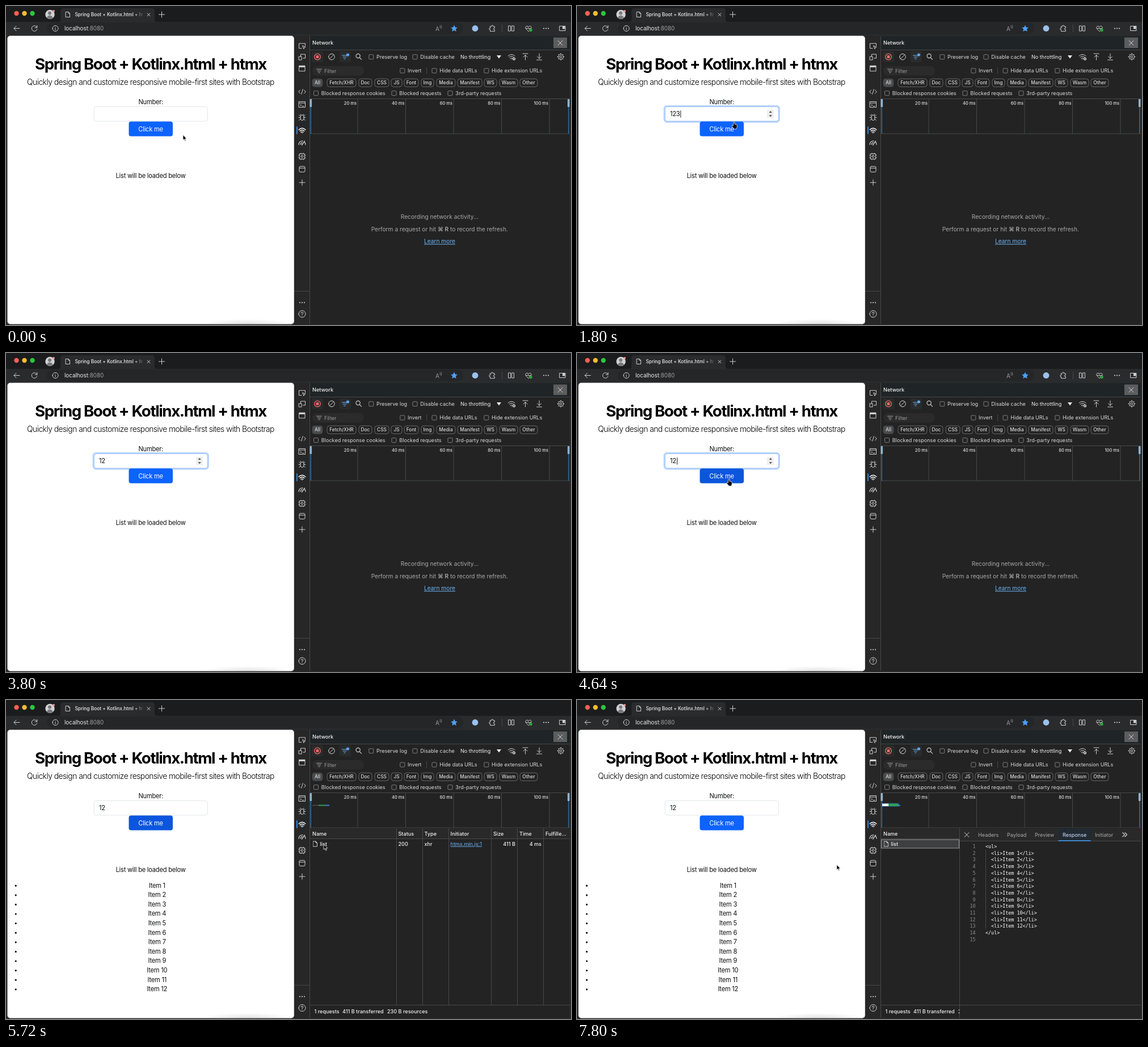
Animation, 996 px wide and 562 px high, one loop 8000 ms. Source, as an HTML page:

```html
<!DOCTYPE html>
<html lang="en">
<head>
<meta charset="utf-8">
<title>Spring Boot + Kotlinx.html + htmx</title>
<style>
html, body { margin: 0; width: 100%; height: 100%; overflow: hidden; background: #1b1c1d; }
svg { display: block; width: 100%; height: 100%; }
text { font-family: Inter, "Noto Sans", sans-serif; font-optical-sizing: none; font-size: 9.1px; fill: #d8d8d8; }
.title { font-size: 27.7px; font-weight: 700; letter-spacing: -1.41px; fill: #000; }
.lead { font-size: 13.84px; font-weight: 350; letter-spacing: -.52px; fill: #000; }
.page { font-size: 11.06px; letter-spacing: -.2px; fill: #0c0d0e; }
.white { fill: #fff; }
.tip { font-size: 9.2px; font-weight: 500; fill: #111; }
.tab { font-size: 8.3px; font-weight: 500; fill: #eee; }
.url { font-size: 9.8px; fill: #eee; }
.pill { font-size: 8.3px; font-weight: 500; }
.ruler { font-size: 7.5px; font-weight: 500; fill: #e4e4e4; }
.bright { font-weight: 500; fill: #f2f2f2; }
.note { font-size: 10.2px; fill: #a9a9a9; }
.dim { fill: #9a9a9a; }
.link { fill: #6cb4f5; text-decoration: underline; }
.code { font: 8.4px "DejaVu Sans Mono", monospace; fill: #fff; }
.num { fill: #8c8c8c; }
.mid { text-anchor: middle; }
.end { text-anchor: end; }
.i { fill: none; stroke: #cfcfcf; stroke-width: 1; stroke-linecap: round; stroke-linejoin: round; }
.line { fill: none; stroke: #474849; stroke-width: 1; }
</style>
</head>
<body>
<svg id="stage" viewBox="0 0 996 562" preserveAspectRatio="none"></svg>
<script>
const LOOP = 8000;
const range = n => Array.from({ length: n }, (_, k) => k);
const text = (x, y, s, cls = '', more = '') => `<text x="${x}" y="${y}" dy=".36em" class="${cls}" ${more}>${s}</text>`;
const rect = (x, y, w, h, fill, r = 0, more = '') => `<rect x="${x}" y="${y}" width="${w}" height="${h}" rx="${r}" fill="${fill}" ${more}/>`;
const dot = (x, y, r, fill) => `<circle cx="${x}" cy="${y}" r="${r}" fill="${fill}"/>`;
const path = (d, cls = 'i', more = '') => `<path d="${d}" class="${cls}" ${more}/>`;
const icon = (x, y, d, more = '') => path(d, 'i', `transform="translate(${x} ${y})" ${more}`);
const group = (id, ...parts) => `<g id="${id}">${parts.join('')}</g>`;
const ring = r => `M${-r} 0a${r} ${r} 0 1 1 ${2 * r} 0a${r} ${r} 0 1 1 ${-2 * r} 0z`;
const box = (w, h) => `M${-w / 2} ${-h / 2}h${w}v${h}h${-w}z`;
const dots = (x, y) => [-4, 0, 4].map(k => dot(x + k, y, 1.1, '#d0d0d0')).join('');
const check = (x, y, label) => rect(x - 4, y - 4, 8, 8, 'none', 1.2, 'stroke="#8b8b8b" stroke-width=".9"') + text(x + 9.3, y, label);

const PLUS = 'M-5 0H5M0 -5V5', CROSS = 'M-4 -4L4 4M4 -4L-4 4';
const PAGE = 'M-3.5 -4.5h4.5l2.5 2.5v6.5h-7zM1 -4.5v2.5h2.5';
const WIFI = 'M-6 -1.5Q0 -7 6 -1.5M-4 .8Q0 -2.8 4 .8M-2 3Q0 1.2 2 3M0 4.4v.2';
const GEAR = ring(2) + ring(4.6) + 'M0 -6v1.4M0 6v-1.4M-6 0h1.4M6 0h-1.4M-4.2 -4.2l1 1M4.2 4.2l-1 -1M4.2 -4.2l-1 1M-4.2 4.2l1 -1';
const FUNNEL = 'M-4.5 -3h9M-2.8 0h5.6M-1.2 3h2.4';
const BEAM = 'M-2 -5.5q2 0 2 1.3q0 -1.3 2 -1.3M0 -4.2V4.2M-2 5.5q2 0 2 -1.3q0 1.3 2 1.3M-1 .9h2';

const browser = [
  rect(0, 0, 996, 562, '#1b1c1d'),
  rect(0, 28, 996, 534, '#2a2b2c'),
  path('M92 28q4 0 4 -4v-15q0 -5 5 -5h156q5 0 5 5v15q0 4 4 4z', '', 'fill="#2a2b2c"'),
  dot(18.5, 13, 4.2, '#fe5f57'), dot(32.5, 13, 4.2, '#febc2e'), dot(46.5, 13, 4.2, '#28c840'),
  dot(77.5, 15, 8.2, '#d2d2d4'), dot(77, 12.5, 3, '#77787b'), path('M71.5 20.5q5.5 -8 11.5 0q-5.5 5 -11.5 0', '', 'fill="#77787b"'),
  dot(84, 9, 2, '#e59a95'),
  icon(109, 15, PAGE),
  text(121.5, 15, 'Spring Boot + Kotlinx.html + htmx', 'tab', 'clip-path="url(#tabClip)"'),
  rect(226, 7, 18, 17, 'url(#fade)'),
  icon(251.5, 15.3, 'M-2.5 -2.5l5 5M2.5 -2.5l-5 5'), icon(274.5, 15, PLUS),
  rect(72, 29, 734, 21, '#252627', 10),
  icon(19, 39.5, 'M5 0H-5M-1 -4.2L-5 0l4 4.2'),
  icon(50, 39.5, 'M4.6 -1.5A4.8 4.8 0 1 0 4.7 1.4M4.8 -5v3.6h-3.6'),
  icon(87, 39.5, ring(5) + 'M0 -.5v3M0 -2.6v.2'),
  text(103, 39.5, 'localhost<tspan fill="#a2a2a2">:8080</tspan>', 'url'),
  text(757, 40, 'A', 'dim', 'style="font-size:10px"'), icon(765, 37, 'M0 -2.2q1.4 2 0 4M2 -3.2q2.2 3 0 6', 'style="stroke:#999;stroke-width:.8"'),
  path('M790 33.6l1.8 3.8 4.1.5-3 2.9.8 4.1-3.7-2-3.7 2 .8-4.1-3-2.9 4.1-.5z', '', 'fill="#4ca0f8"'),
  dot(827, 39.5, 5.4, '#9cc0ee'),
  icon(857.5, 39.5, 'M-4 -3.5h2.4q-.4 -2 1.4 -2t1.4 2h2.6v3q-2 -.4 -2 1.3t2 1.3v3h-7.8v-3q-2 .3 -2 -1.3t2 -1.3z'),
  path('M874.5 33v13', 'line'),
  icon(890.5, 39.5, 'M-1.4 -4.5h-3.6v9h3.6zM1.4 -4.5H5v9H1.4z'),
  icon(921, 39.5, 'M0 5L-4.6 .6C-7 -3 -2.4 -6 0 -2.6C2.4 -6 7 -3 4.6 .6zM-4 0h2.5l1 -1.5 1.5 3 1 -1.5h2'),
  dot(925, 42.5, 2.8, '#2ba13a'),
  dots(952, 39.5),
  icon(981, 39.5, box(10, 8)), rect(981, 36, 4.5, 4.5, '#cfcfcf')
];

const page = [
  rect(2.5, 52.5, 505.3, 508, '#fff', 5),
  rect(345, 543, 162, 17, 'url(#shade)', 4),
  text(255, 102.3, 'Spring Boot + Kotlinx.html + htmx', 'title mid'),
  text(255, 134, 'Quickly design and customize responsive mobile-first sites with Bootstrap', 'lead mid'),
  text(255.3, 169.4, 'Number:', 'page mid'),
  text(255, 299, 'List will be loaded below', 'page mid'),
  group('focus', rect(153.9, 176.1, 202.7, 28.2, 'none', 5, 'stroke="#bdd6fd" stroke-width="2.8"')),
  rect(155.2, 177.4, 200.2, 25.6, '#fff', 4, 'id="field" stroke="#dee2e6" stroke-width=".9"'),
  group('spinner', rect(335, 183, 12, 14.5, '#efefef'), path('M338.6 188l2.6 -3 2.6 3zM338.6 192.3l2.6 3 2.6 -3z', '', 'fill="#444"')),
  ...['1', '12', '123'].map((s, k) => group('typed' + k, text(164, 190.5, s, 'page'))),
  group('caret', rect(0, 184.2, .9, 12.4, '#000')),
  rect(216.5, 203.6, 77.5, 26, '#0d63fd', 4, 'id="button"'),
  text(255, 216.9, 'Click me', 'page white mid'),
  group('tooltip',
    path('M153 209.3h3l5.5 -5 5.5 5h189q3 0 3 3v22q0 3 -3 3h-203q-3 0 -3 -3v-22q0 -3 3 -3z', '',
      'fill="#fff" stroke="#a3a3a3" stroke-width=".9" filter="url(#drop)"'),
    rect(156, 215.3, 15.5, 15.5, '#f58510', 1.5), rect(162.8, 217.8, 2, 6.7, '#fff'), rect(162.8, 226.2, 2, 2, '#fff'),
    text(177, 223.2, 'Value must be less than or equal to 100.', 'tip')),
  group('items', ...range(12).map(k => dot(17.2, 327.2 + k * 16.6, 1.6, '#0c0d0e') + text(266.3, 326.6 + k * 16.6, `Item ${k + 1}`, 'page mid')))
];

const pills = [['All', 540, 18], ['Fetch/XHR', 566, 51], ['Doc', 622, 23], ['CSS', 650, 25], ['JS', 679, 19], ['Font', 702, 25], ['Img', 732, 22],
  ['Media', 759, 33], ['Manifest', 796, 43], ['WS', 843, 22], ['Wasm', 870, 32], ['Other', 906, 31]];

const tools = [
  rect(508, 53, 28, 509, '#272727'),
  rect(536, 53, 457.5, 507.5, '#232323'),
  rect(536, 53, 457.5, 24, '#1f2426'),
  path('M535.5 53V560M508 502.5h27M536 77.5h457', 'line'),
  icon(522, 70.5, 'M-1 4h-4.5v-8.5h11v4M1 -.5l5 2.2 -2.2 .8 -.8 2.2z'),
  icon(522, 90, 'M-2.5 -1v-4h8v7h-4M-5.5 -1h4.5v6h-4.5z'),
  icon(522, 110, box(10, 9.5)), rect(517, 105, 10, 3, '#cfcfcf'),
  icon(522, 151, 'M-3.5 -3L-6.2 0l2.7 3M3.5 -3L6.2 0l-2.7 3M1.3 -4.3l-2.6 8.6'),
  icon(522, 173.5, box(11, 10) + 'M-5.5 -2.5h11M-3 0l1.8 1.3 -1.8 1.3M.3 3h2.6'),
  icon(522, 196.5, 'M-3 -1.5q0 -3 3 -3t3 3v3q0 3.5 -3 3.5t-3 -3.5zM-3 0h-3M3 0h3M-3 -2l-2.3 -2.3M3 -2l2.3 -2.3M-3 2.6l-2.3 2.3M3 2.6l2.3 2.3M-2 -4.5l-1 -1.6M2 -4.5l1 -1.6'),
  rect(512, 212, 1.8, 14, '#2f8ee8', 1),
  icon(522, 219.5, WIFI, 'style="stroke:#fff;stroke-width:1.2"'),
  icon(522, 242, 'M-6 2Q-5 -4.5 1 -4M4 -2.5Q6 -1 6 2M-3 2Q-2 -1.4 0 -1.4M-.5 3L4.5 -4', 'style="stroke-width:1.3"'),
  icon(522, 265, box(9, 9) + ring(2) + 'M-2 -4.5v-1.5M2 -4.5v-1.5M-2 4.5v1.5M2 4.5v1.5M-4.5 -2h-1.5M-4.5 2h-1.5M4.5 -2h1.5M4.5 2h1.5'),
  icon(522, 287.5, 'M-3 -5h6q2 0 2 2v6q0 2 -2 2h-6q-2 0 -2 -2v-6q0 -2 2 -2zM-5 -2h10'),
  icon(522, 311, PLUS), dots(522, 522.5),
  icon(522, 542.5, ring(6) + 'M-1.8 -1.3q0 -2 1.8 -2t1.8 1.7q0 1.2 -1.8 2v1M0 3.2v.2'),

  text(540, 65, 'Network', 'bright'),
  rect(965, 55.5, 24, 18.5, '#5b5d5e'), icon(977, 65, CROSS),
  rect(539, 80, 20, 19, '#2a2b2c', 2), rect(588, 80, 20, 19, '#2a2b2c', 2),
  icon(549, 89.5, ring(5.3), 'style="stroke:#ef6b66;stroke-width:1.3"'), rect(546.6, 87.1, 4.8, 4.8, '#ef6b66', .5),
  icon(574, 89.5, ring(5.3) + 'M-3.7 3.7l7.4 -7.4'),
  icon(597, 90, FUNNEL, 'style="stroke:#74b6f2;stroke-width:1.2"'), dot(602.5, 86, 2.6, '#5aa7f0'),
  icon(621.5, 89, 'M-4.5 -1a3.6 3.6 0 1 1 7.2 0a3.6 3.6 0 1 1 -7.2 0M1.8 1.8l3.2 3.4', 'style="stroke-width:1.2"'),
  check(643.8, 89.7, 'Preserve log'), check(721, 89.7, 'Disable cache'),
  text(801, 89.7, 'No throttling', '', 'style="fill:#f0f0f0"'), path('M865 87h8l-4 5.6z', '', 'fill="#eee"'),
  icon(891, 89.5, WIFI), dot(895.5, 93, 2.6, '#cfcfcf'), dot(895.5, 93, 1, '#232323'),
  icon(915.5, 89.5, 'M-4.5 -5.5h9M0 5.5V-3M-3.5 .4L0 -3l3.5 3.4'),
  icon(940, 89.5, 'M-4.5 5.5h9M0 -5.5V3M-3.5 -.4L0 3l3.5 -3.4'),
  icon(978, 89.5, GEAR),
  rect(540, 106, 91, 16.5, '#2b2b2b', 8), icon(552, 114.3, FUNNEL, 'style="stroke:#aaa"'), text(561, 114.3, 'Filter', 'dim'),
  check(698.8, 114, 'Invert'), path('M741.5 108v12', 'line'), check(755, 114, 'Hide data URLs'), check(846.8, 114, 'Hide extension URLs'),
  ...pills.map(([label, x, w], k) => rect(x, 128.3, w, 14, k ? 'none' : '#4a4b4c', 4, `stroke="${k ? '#77787a' : '#4a4b4c'}" stroke-width=".8"`) +
    text(x + w / 2, 135.5, label, 'pill mid')),
  check(546.5, 153.7, 'Blocked response cookies'), check(684, 153.7, 'Blocked requests'), check(783, 153.7, '3rd-party requests'),

  path('M536 163.5h457.5M536 225h457.5', 'line'),
  ...range(5).map(k => path(`M${620 + k * 84.5} 164v61`, 'line') + text(618 + k * 84.5, 171, `${20 * (k + 1)} ms`, 'ruler end')),
  ...[537.3, 991.7].map(x => rect(x - .6, 164, 1.2, 61, '#2f7fb8') + rect(x - 1.8, 164, 3.6, 14, '#8fb3cd', 1)),
  group('thinBar', rect(540, 185, 11, 1.2, '#555'), rect(551, 184.6, 12, 2, '#31a052'), rect(563, 184.6, 7, 2, '#3c7fe0')),
  group('thickBar', rect(537, 181.8, 30.5, 6, '#1c5ca8'), rect(538, 182.6, 11, 4.4, '#fff'), rect(549, 182.6, 17, 4.4, '#31a052'), rect(566, 184.6, 4, 2, '#3c7fe0')),

  group('empty',
    text(764.3, 371.8, 'Recording network activity...', 'note mid'),
    text(764.3, 393.3, 'Perform a request or hit <tspan font-weight="600">⌘ R</tspan> to record the refresh.', 'note mid'),
    text(764.5, 414.6, 'Learn more', 'note link mid')),

  group('table',
    rect(536, 225.5, 457.5, 19, '#292929'),
    path('M536 244.5h457.5M536 537.5h457.5' + [688.5, 734.5, 780.5, 855.5, 901.5, 947.5].map(x => `M${x} 226V537`).join(''), 'line'),
    ...[['Name', 540], ['Status', 691.5], ['Type', 737.5], ['Initiator', 783.5], ['Size', 859], ['Time', 905], ['Fulfille...', 951]]
      .map(([s, x]) => text(x, 235.3, s, 'bright')),
    text(691.5, 253.5, '200', 'bright'), text(737.5, 253.5, 'xhr', 'bright'), text(783.5, 253.5, 'htmx.min.js:1', 'link'),
    text(898, 253.5, '411 B', 'bright end'), text(944, 253.5, '4 ms', 'bright end'),
    text(543.5, 549, '1 requests', 'bright'), text(593, 549, '411 B transferred', 'bright'), text(672, 549, '230 B resources', 'bright')),

  group('detail',
    rect(674, 225.5, 319.5, 335, '#232323'),
    rect(536.5, 246, 137, 15, '#3e3f40', 0, 'stroke="#9c9d9e" stroke-width="1"'),
    rect(674.5, 225.5, 319, 23, '#292929'),
    rect(848.5, 226, 57, 22, '#212a33'),
    path('M674.5 225.5V560M674.5 248.5h319M674.5 537.5h319', 'line'),
    rect(848.5, 247, 57, 1.6, '#3f97ea'),
    icon(687, 237.5, CROSS),
    ...[['Headers', 707], ['Payload', 758], ['Preview', 807], ['Response', 856], ['Initiator', 913]].map(([s, x]) =>
      text(x, 237.3, s, '', s === 'Response' ? 'style="fill:#cfe6ff"' : 'style="fill:#ababab"')),
    icon(965.5, 237.3, 'M-3.5 -3.5L0 0l-3.5 3.5M.5 -3.5L4 0L.5 3.5', 'style="stroke-width:1.3"'),
    path('M720.5 264V403', 'line'),
    ...range(15).map(k => {
      const y = 258 + k * 11.7;
      const line = k === 0 ? '&lt;ul&gt;' : k === 13 ? '&lt;/ul&gt;' : k < 13 ? `&lt;li&gt;Item ${k}&lt;/li&gt;` : '';
      return text(702.5, y, k + 1, 'code num end') + text(k > 0 && k < 13 ? 730 : 720, y, line, 'code');
    })),
  group('entry', icon(545, 253.5, PAGE), text(553.5, 253.5, 'list', 'bright'))
];

const cursor = group('cursor',
  group('arrow', path('M0 0V9.4L2.1 7.5L3.6 11L5.1 10.4L3.6 7H6.5Z', '', 'fill="#000" stroke="#fff" stroke-width=".8"')),
  group('hand', path('M-1 1q0 -1.2 1 -1.2t1 1.2v3.2q1 -.7 1.5 .3q1 -.5 1.4 .4q1.3 -.3 1.3 1v2.6q0 1.5 -1 3v.8h-5v-.9q-1.5 -1.5 -3.3 -4q-.5 -1.2 .6 -1.3q1 .1 1.5 1z', '', 'fill="#000" stroke="#fff" stroke-width=".8"')),
  group('beam', path(BEAM, '', 'fill="none" stroke="#fff" stroke-width="2"'), path(BEAM, '', 'fill="none" stroke="#111" stroke-width="1"')));

document.getElementById('stage').innerHTML = `<defs>
  <clipPath id="tabClip"><rect x="118" y="4" width="123" height="24"/></clipPath>
  <linearGradient id="fade"><stop offset="0" stop-color="#2a2b2c" stop-opacity="0"/><stop offset="1" stop-color="#2a2b2c"/></linearGradient>
  <radialGradient id="shade" cx=".5" cy="1" r=".5"><stop offset="0" stop-color="#000" stop-opacity=".11"/><stop offset="1" stop-color="#000" stop-opacity="0"/></radialGradient>
  <filter id="drop" x="-5%" y="-20%" width="112%" height="150%"><feDropShadow dx="1.5" dy="2" stdDeviation="1.3" flood-opacity=".4"/></filter>
</defs>` + [...browser, ...page, ...tools, cursor].join('');

// Each step is [time in ms, value]; the default easing holds a value until the next step.
function track(id, prop, steps, easing = 'step-end') {
  const frames = steps.map(([t, value]) => ({ offset: t / LOOP, [prop]: value, easing }));
  frames.push({ offset: 1, [prop]: steps.at(-1)[1] });
  document.getElementById(id).animate(frames, { duration: LOOP, iterations: Infinity });
}
// Hidden at first, then toggled at each given time.
const toggle = (id, ...times) => track(id, 'opacity', [[0, 0], ...times.map((t, k) => [t, (k + 1) % 2])]);

const CLICK = 4760, LOADED = 4800, OPENED = 5920;
toggle('typed0', 1320, 1440);
toggle('typed1', 1440, 1560, 3280);
toggle('typed2', 1560, 3280);
toggle('caret', 1000, 2060, 2240, 2740, 3240, 3780, 4280, CLICK);
track('caret', 'transform', [[0, 164.3], [1320, 169.4], [1440, 176], [1560, 182.3], [3280, 176]].map(([t, x]) => [t, `translateX(${x}px)`]));
toggle('spinner', 920, CLICK);
track('focus', 'opacity', [[0, 0], [1000, 0], [1150, 1], [CLICK, 1], [CLICK + 150, 0]], 'linear');
track('field', 'stroke', [[0, '#dee2e6'], [1000, '#dee2e6'], [1150, '#86b7fe'], [CLICK, '#86b7fe'], [CLICK + 150, '#dee2e6']], 'linear');
const idle = '#0d63fd', hover = '#0b56dc';
track('button', 'fill', [[0, idle], [1800, idle], [1950, hover], [3000, hover], [3150, idle], [4440, idle], [4590, hover], [OPENED, hover], [OPENED + 150, idle]], 'linear');
track('tooltip', 'opacity', [[0, 0], [2240, 0], [2320, 1], [3280, 1], [3400, 0]], 'linear');
for (const id of ['items', 'table', 'entry']) toggle(id, LOADED);
track('empty', 'opacity', [[0, 1], [LOADED, 0]]);
toggle('thinBar', LOADED, OPENED);
toggle('thickBar', OPENED);
toggle('detail', OPENED);

track('cursor', 'transform', [
  [0, 312, 227], [400, 312, 227], [840, 301, 212], [1000, 296, 191], [1600, 292, 191], [1800, 277, 204.3], [2000, 271, 221],
  [2360, 271, 221], [2560, 276, 191], [4080, 276, 191], [4480, 268, 222], [4960, 268, 222], [5240, 506.5, 264.5], [5520, 560, 254],
  [6600, 562, 253.8], [6800, 724, 340], [7020, 285, 345], [7280, 724, 330], [7640, 724, 330], [7680, 750, 330], [7800, 457.8, 290]
].map(([t, x, y]) => [t, `translate(${x}px, ${y}px)`]), 'ease-in-out');
track('arrow', 'opacity', [[0, 1], [920, 0], [5000, 1], [6760, 0], [6880, 1], [7200, 0], [7720, 1]]);
toggle('hand', 1760, 2440, 4320, 5000);
toggle('beam', 920, 1320, 1640, 1760, 2440, 3280, 4080, 4320, 6760, 6880, 7200, 7720);
</script>
</body>
</html>
```
